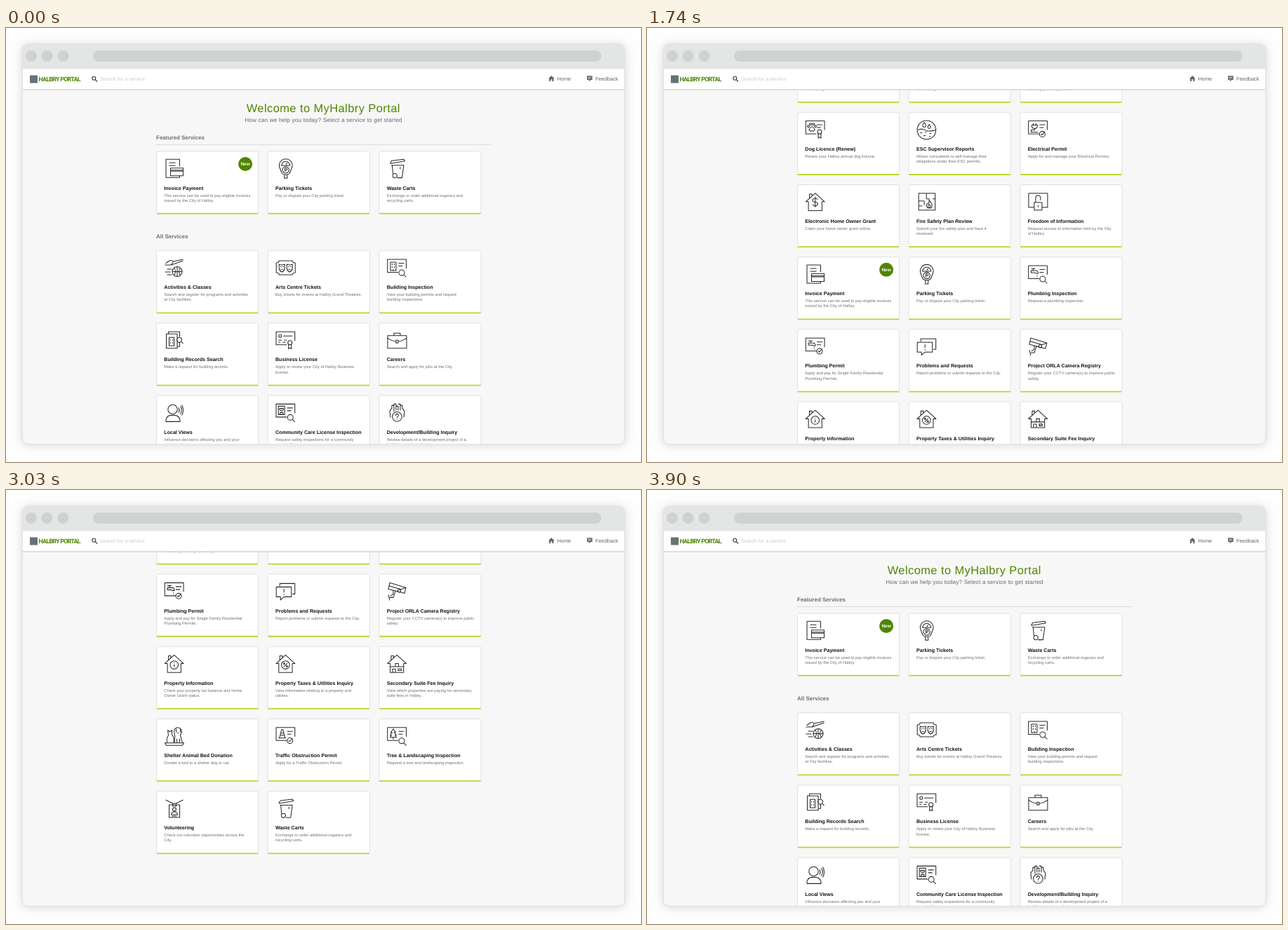
An HTML page that plays this animation: 905 by 619 pixels, repeating every 5400 ms.

```html
<!DOCTYPE html>
<html lang="en">
<head>
<meta charset="utf-8">
<title>Service portal</title>
<style>
  html, body { margin: 0; width: 100%; height: 100%; overflow: hidden; background: #fefefe; }
  svg { display: block; width: 905px; height: 619px; }
  text { font-family: "Liberation Sans", Arial, sans-serif; text-rendering: geometricPrecision; fill: #5f686d; }
  .frame { fill: #e3e6e5; filter: drop-shadow(0 1px 7px #0002); }
  .knob { fill: #cfd2d1; }
  .brand { font: bold 8.8px Roboto, sans-serif; letter-spacing: -.7px; fill: #4f8500; }
  .nav { font-size: 7.4px; }
  .hint { font-size: 7.2px; fill: #c9cccc; }
  .welcome { font-size: 16.4px; letter-spacing: .45px; fill: #4f8500; text-anchor: middle; }
  .lead { font-size: 8.2px; letter-spacing: .17px; text-anchor: middle; }
  .section { font-size: 8px; font-weight: bold; fill: #687176; }
  .name { font-size: 7.1px; font-weight: bold; fill: #111; }
  .about { font-size: 5.77px; fill: #6c7377; }
  .link { font-size: 5.7px; fill: #4f8500; }
  .new { font-size: 6.5px; font-weight: bold; fill: #fff; text-anchor: middle; }
  .card { fill: #fff; stroke: #dedede; stroke-width: .9; }
  .icon { fill: none; stroke: #262a2b; stroke-width: 1.05; stroke-linejoin: round; }
</style>
</head>
<body>
<svg id="stage" viewBox="0 0 905 619"></svg>
<script>
const ring = (x, y, r) => `M${x - r} ${y}a${r} ${r} 0 1 0 ${2 * r} 0a${r} ${r} 0 1 0 ${-2 * r} 0`;
const text = (cls, x, y, str) => `<text class="${cls}" x="${x}" y="${y}">${str.replace(/&/g, '&amp;')}</text>`;

// Parts shared by several icons, drawn in a 29 x 28 box
const sheet = 'M16 20.5H.8V2H27.5V15';
const lens = ring(21, 21, 4) + 'M24 24l3.5 3.5';
const tick = ring(20.5, 20.8, 4) + 'M18.5 20.5l1.5 1.5 4-4.5';
const ribbon = ring(20.5, 17.5, 3) + 'M18.5 20v6.5l2-1.5 2 1.5V20';
const lines = 'M16.5 7.5h8M16.5 11.5h6';
const house = 'M.7 14L14.2 1.8 27.7 14H23.8V26.6H4.6V14zM6 9V3h3.5v3';
const faucet = 'M4.5 6h6M7.5 6v3M4.5 9h7q3 0 3 4h-3q0-1-2-1h-5zM13 15v1M13 17.5v1';
const tower = 'M5 6h8v12H5zM7.5 8v2M10.5 8v2M7.5 12v2M10.5 12v2M9 16v2';

const icons = {
  invoice: 'M22 11V1H2.5v26H22v-2M7 6h9M7 10h9M9 13.5h18v11H9zM9 16.5h18M9 18h18',
  meter: 'M9 21L5.5 12A9.3 9.3 0 1 1 23.5 12L20 21Q14.5 25 9 21M12.5 23v5h4v-5M8.5 10a6 6 0 0 1 12 0zM14.5 9l2-3M13.3 18.5v-5H15a1.4 1.4 0 0 1 0 2.8h-1.7' + ring(14.5, 16, 4.6),
  cart: 'M5 6L7 3 24 1 25.5 3.5 5 7zM6 9.5H24L21.5 27.3H14.5M7.5 9.5l1 12M19 12v3' + ring(11.3, 24.3, 3.1),
  sport: 'M2 8Q9 1 13 5L27 2M1 10H10L27 4M10 10l3-5M4 16h7M1 20h8M4 24h7M18.5 12.5v14M11.5 19.5h14M14 14q4 5 0 11M23 14q-4 5 0 11' + ring(18.5, 19.5, 7),
  masks: 'M5 4H24Q24 7 28 7V21Q24 21 24 24H5Q5 21 1 21V7Q5 7 5 4zM5 9q4 2 8 0v6q-1 4-4 5q-3-1-4-5zM16 9q4 2 8 0v6q-1 4-4 5q-3-1-4-5zM7 12.5h1.5M10 12.5h1.5M7.5 16q1.5 1.5 3 0M18 12.5h1.5M21 12.5h1.5M18.5 17q1.5-1.5 3 0',
  building: sheet + tower + lines + lens,
  records: 'M6 5V2H22V9M22 17V23H19M3 5H18.5V25.5H3zM7 10h7v12H7zM9 13v1.5M12 13v1.5M9 17v1.5M12 17v1.5M24 16l3 3' + ring(21.5, 13.5, 3.5),
  license: sheet + ring(6.5, 8, 2) + 'M11 8h13M4 14h5M12 14h4M4 17h3M10 17h4' + ribbon,
  briefcase: 'M1 7.5H28V25.5H1zM10 7.5V4H19V7.5M1 11Q7 15.5 13 16M16 16Q22 15.5 28 11M13 14h3v4h-3z',
  speaker: ring(12, 9.5, 6.7) + 'M2.5 27v-3q2-6 7-6h5q6 0 8 6v3zM20.5 7q2 3.5 0 7M23 5q3.5 5 0 11M25 3q4 7 0 15',
  care: sheet + 'M4 5h9v12H4zM8.5 9q-2-2-3 0 0 1 3 3 3-2 3-3-1-2-3 0M6.5 17v-3h4v3' + lines + lens,
  inquiry: ring(14.5, 20, 6.8) + 'M12.5 18.5q0-2.5 2-2.5t2 2q0 1-2 2.5v1M14.5 23v1M5 21l-1-9 3-4V4h3v9M10 8V2h3v9M13 5h3v6M16 2h3v9M19 4h3v4l3 4-1 9',
  dog: sheet + 'M5.5 15q0-3 4-5 4 2 4 5-2 2.5-4 1-2 1.5-4-1' + ring(4.5, 9.5, 1.4) + ring(7.5, 6.5, 1.4) + ring(11.5, 6.5, 1.4) + ring(14.5, 9.5, 1.4) + lines + ribbon,
  soil: ring(14.2, 14.8, 13.3) + 'M2 15q5-3 10 0t15.5 0M5 19h3M12 18h2M18 20h3M10 23h3M18 24h2M11 4q-5 6 0 7 5-1 0-7M18 7q-4 5 0 6 4-1 0-6',
  electric: sheet + 'M7.5 5v3M11.5 5v3M5.5 8h8v2q-1 3-4 3t-4-3zM9.5 13v2h-5v3h10' + lines + tick,
  grant: house + 'M17.7 11q-1-2-3.5-2t-3.5 2.5 3.5 3 3.5 3-3.5 2.5-3.5-2M14.2 7v15',
  fire: 'M3 2H26.5V26H3zM3 13h8M14 2v8M14 10h5M23 10h3.5M11 13v6M3 20h5M18 11q1 3 3 5t0 7h-5q-4-4 0-7 2 1 2-5M18 17q-3 4 0 6 3-2 0-6',
  unlock: 'M9 22H1V2H28V22H20M9 15h11v11H9zM11 15V9q0-4 3.5-4T18 9v3M14.5 19v3',
  pipeCheck: sheet + faucet + lines + lens,
  pipe: sheet + faucet + lines + tick,
  chat: 'M6 7V3H27.5V18H24M1 8H22.5V22H12L7 26.5V22H1zM12 11v5M12 18v1.5',
  camera: 'M4 2L27 9 25 17 2 11zM3 6.5l17 5 7-2.5M9 13v5l-4 3M2 19l2 8M4 23h5l3-9' + ring(17.5, 13.5, 2.2),
  info: house + ring(14.2, 16, 5.8) + 'M14.2 15v4M14.2 12.5v1',
  tax: house + ring(14.2, 16, 5.8) + 'M11.8 18.5l5-5' + ring(12.2, 14, 1) + ring(16.2, 18, 1),
  suite: house + 'M4.6 18.5h19.2M12 18.5v-4.5h4.5v4.5M8 26.6v-5h4v5M16 21.5h4.5v2.5H16z',
  pets: 'M1 24H28L26 27.5H3zM4 24q-1-7 2-11L5 6l3 2 3-2v6q4 5 2 12M15 24V13L14 8q0-5 5-6 5 0 6 6l-2 5 3 11M17 4v5M23 4v5M19 10h2M18 24v-6M22 24v-6',
  cone: sheet + 'M4 17h11M5.5 17L8.5 5h2l3 12M7.5 10h4M6.5 13h6' + lines + tick,
  tree: sheet + 'M9 4L5.5 9h2l-3 4h2l-2 3h9l-2-3h2l-3-4h2zM9 16v3' + lines + lens,
  badge: 'M2 2L12 7H17L27 2M12 7v4h5V7M7 9h15v18H7zM10 23q0-4 4.5-4t4.5 4zM11 25h7' + ring(14.5, 15.5, 2.5)
};

const invoice = ['invoice', 'Invoice Payment', 'This service can be used to pay eligible invoices|issued by the City of Halbry.', true];
const parking = ['meter', 'Parking Tickets', 'Pay or dispute your City parking ticket.'];
const waste = ['cart', 'Waste Carts', 'Exchange or order additional organics and|recycling carts.'];
const featured = [invoice, parking, waste];
const services = [
  ['sport', 'Activities & Classes', 'Search and register for programs and activities|at City facilities.'],
  ['masks', 'Arts Centre Tickets', 'Buy tickets for events at Halbry Grand Theatres.'],
  ['building', 'Building Inspection', 'View your building permits and request|building inspections.'],
  ['records', 'Building Records Search', 'Make a request for building records.'],
  ['license', 'Business License', 'Apply or renew your City of Halbry Business|license.'],
  ['briefcase', 'Careers', 'Search and apply for jobs at the City.'],
  ['speaker', 'Local Views', 'Influence decisions affecting you and your|community.'],
  ['care', 'Community Care License Inspection', 'Request safety inspections for a community|care facility.'],
  ['inquiry', 'Development/Building Inquiry', 'Review details of a development project of a|building permit application.'],
  ['dog', 'Dog Licence (Renew)', 'Renew your Halbry annual dog licence.'],
  ['soil', 'ESC Supervisor Reports', 'Allows consultants to self-manage their|obligations under their ESC permits.'],
  ['electric', 'Electrical Permit', 'Apply for and manage your Electrical Permits.'],
  ['grant', 'Electronic Home Owner Grant', 'Claim your home owner grant online.'],
  ['fire', 'Fire Safety Plan Review', 'Submit your fire safety plan and have it|reviewed.'],
  ['unlock', 'Freedom of Information', 'Request access to information held by the City|of Halbry.'],
  invoice,
  parking,
  ['pipeCheck', 'Plumbing Inspection', 'Request a plumbing inspection.'],
  ['pipe', 'Plumbing Permit', 'Apply and pay for Single Family Residential|Plumbing Permits.'],
  ['chat', 'Problems and Requests', 'Report problems or submit requests to the City.'],
  ['camera', 'Project ORLA Camera Registry', 'Register your CCTV camera(s) to improve public|safety.'],
  ['info', 'Property Information', 'Check your property tax balance and Home|Owner Grant status.'],
  ['tax', 'Property Taxes & Utilities Inquiry', 'View information relating to a property and|utilities.'],
  ['suite', 'Secondary Suite Fee Inquiry', 'View which properties are paying for secondary|suite fees in Halbry.'],
  ['pets', 'Shelter Animal Bed Donation', 'Donate a bed to a shelter dog or cat.'],
  ['cone', 'Traffic Obstruction Permit', 'Apply for a Traffic Obstruction Permit.'],
  ['tree', 'Tree & Landscaping Inspection', 'Request a tree and landscaping inspection.'],
  ['badge', 'Volunteering', 'Check out volunteer opportunities across the|City.'],
  waste
];

const SCROLL = 845, STEPS = 30, STEP_MS = 30, LOOP = 5400;

function card([icon, name, about, isNew], x, y) {
  return `<g transform="translate(${x} ${y})">
    <rect class="card" width="145" height="88.8" rx="1.5"/>
    <rect y="87.8" width="145" height="1.8" rx=".8" fill="#b6d933"/>
    <path class="icon" transform="translate(11 10.3)" d="${icons[icon]}"/>
    ${isNew ? '<circle cx="126.6" cy="18" r="10" fill="#4f8500"/>' + text('new', 126.6, 20.4, 'New') : ''}
    ${text('name', 10.8, 54.6, name)}
    ${about.split('|').map((line, i) => text('about', 10.8, 64.6 + i * 7.2, line)).join('')}
  </g>`;
}

const grid = (list, top) => list.map((item, i) =>
  card(item, 214.5 + i % 3 * 158.7, top + Math.floor(i / 3) * 103.2)).join('');

document.getElementById('stage').innerHTML = `
  <clipPath id="view"><path d="M24 88H881V585q0 8-8 8H32q-8 0-8-8z"/></clipPath>
  <rect class="frame" x="22" y="22" width="861" height="573" rx="10"/>
  ${[36, 58.5, 81.5].map(x => `<circle class="knob" cx="${x}" cy="40" r="8"/>`).join('')}
  <rect class="knob" x="124" y="32.3" width="724.5" height="15.6" rx="7.8"/>
  <g clip-path="url(#view)">
    <rect x="24" y="88" width="857" height="505" fill="#f7f7f7"/>
    <g id="page">
      ${text('welcome', 452.3, 120, 'Welcome to MyHalbry Portal')}
      ${text('lead', 452.5, 134, 'How can we help you today? Select a service to get started')}
      ${text('section', 214, 158.7, 'Featured Services')}
      <path d="M214 166.4H691" stroke="#d4d4d4" stroke-width=".8"/>
      ${grid(featured, 176)}
      ${text('section', 214, 300.3, 'All Services')}
      ${grid(services, 317.7)}
      <g transform="translate(0 ${SCROLL})">
        <rect x="65" y="571" width="10" height="10" fill="#5f686d"/>
        <text x="76" y="579.5" font-size="7.1">HALBRY</text>
        <text x="79" y="572.8" font-size="2.6">city of</text>
        <text x="83" y="583.5" font-size="2.6" style="fill:#4f8500">a good place to live</text>
        ${text('link', 787, 574, 'Terms')}
        ${text('link', 821, 574, 'Privacy')}
      </g>
    </g>
  </g>
  <rect x="24" y="58.5" width="857" height="29.5" fill="#fff"/>
  <path d="M24 88H881" stroke="#d4d5d5" stroke-width="1.3"/>
  <rect x="34" y="67.5" width="11" height="11" fill="#687176"/>
  ${text('brand', 46.5, 76.2, 'HALBRY PORTAL')}
  <path d="${ring(125.3, 71.8, 2.5)}M127.2 73.7l2.8 2.8" fill="none" stroke="#333" stroke-width="1.1"/>
  ${text('hint', 134, 75.2, 'Search for a service')}
  <path d="M773 72.3l4.3-4.3 4.3 4.3h-1.1V76h-2.2v-2.7h-2V76h-2.2v-3.7z" fill="#5f686d"/>
  ${text('nav', 785.5, 75.3, 'Home')}
  <path d="M828 68.3h7.6v5.8h-2.4l-1.6 2-1.4-2H828z" fill="#5f686d"/>
  <path d="M829.5 70.3h4.6M829.5 72h3.4" stroke="#fff" stroke-width=".7"/>
  ${text('nav', 840, 75.3, 'Feedback')}`;

const page = document.getElementById('page');
const stepsSince = (t, start) => Math.min(STEPS, Math.max(0, Math.floor((t - start) / STEP_MS)));

function draw() {
  const t = performance.now() % LOOP;
  const steps = stepsSince(t, 1200) - stepsSince(t, 3000);
  page.setAttribute('transform', `translate(0 ${-SCROLL * steps / STEPS})`);
  requestAnimationFrame(draw);
}
draw();
</script>
</body>
</html>
```
